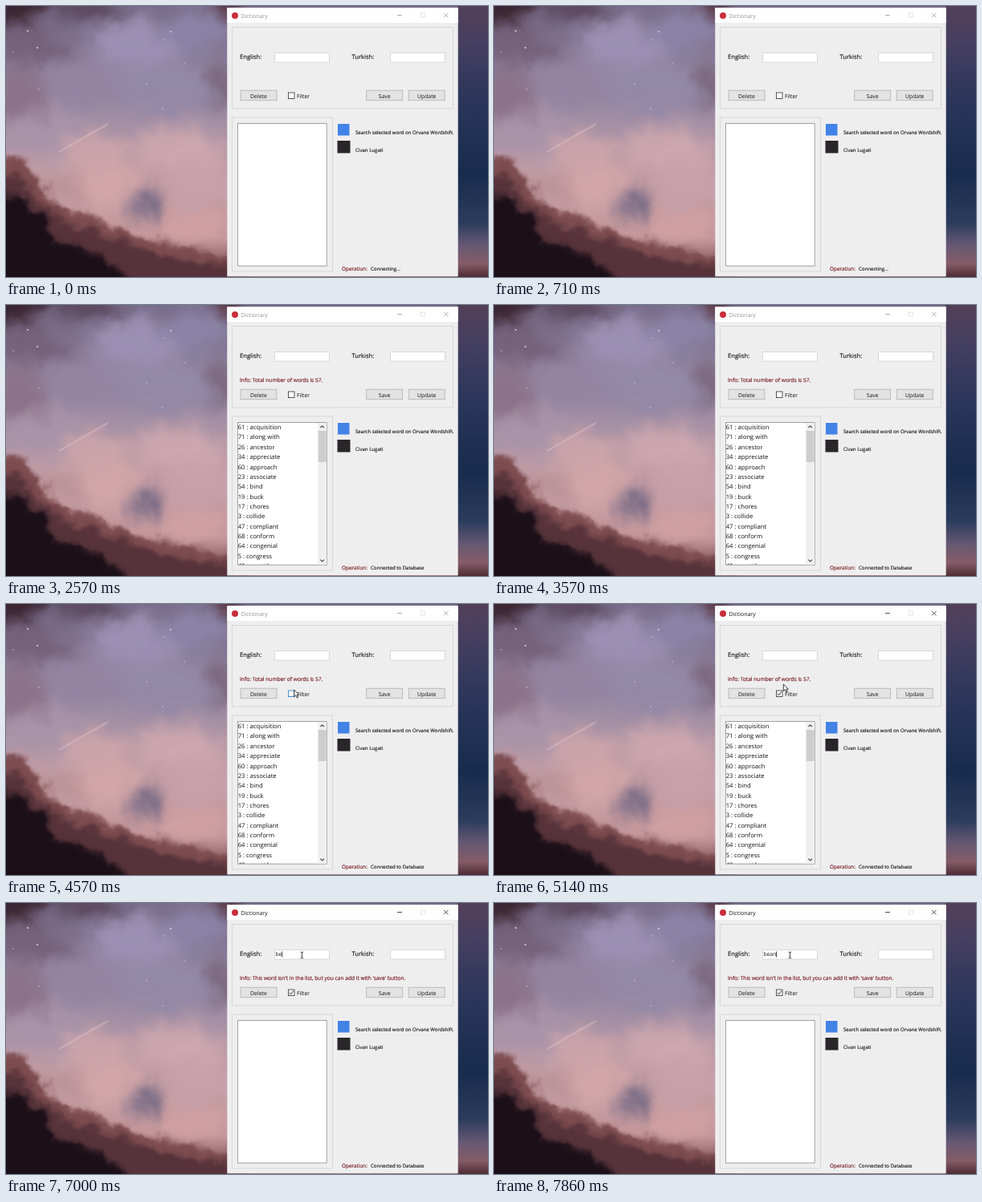
These frames come from a looping animation (600x338 px, 8000 ms). An HTML page:

```html
<!DOCTYPE html>
<html lang="en">
<head>
<meta charset="utf-8">
<title>Dictionary</title>
<style>
  html, body { margin: 0; width: 100%; height: 100%; overflow: hidden; background: #3a2c38; }
  svg { position: absolute; left: 0; top: 0; width: 600px; height: 338px; }
  text { font-family: "Open Sans", "Noto Sans", sans-serif; font-size: 6.9px; fill: #111; white-space: pre; text-rendering: geometricPrecision; }
  .label { font-size: 7.6px; stroke: #111; stroke-width: .12px; }
  .small { font-size: 6.1px; stroke: #111; stroke-width: .12px; }
  .info { font-size: 6.64px; fill: #7c2529; stroke: #7c2529; stroke-width: .2px; }
  .row { font-size: 7.7px; }
  .group { fill: none; stroke: #d2d2d2; stroke-width: .8; }
  .field { fill: #fff; stroke: #cbcbcb; stroke-width: .7; }
  .button { fill: #e3e3e3; stroke: #b0b0b0; stroke-width: .8; }
  .line { fill: none; stroke-width: .8; }
</style>
</head>
<body>
<svg viewBox="0 0 600 338">
  <defs>
    <linearGradient id="dusk" x2="0" y2="1">
      <stop offset="0" stop-color="#766a88"/>
      <stop offset=".35" stop-color="#9789a4"/>
      <stop offset=".6" stop-color="#c09ca6"/>
      <stop offset=".85" stop-color="#c4979b"/>
      <stop offset="1" stop-color="#6e4246"/>
    </linearGradient>
    <linearGradient id="night" x2="0" y2="1">
      <stop offset="0" stop-color="#53405a"/>
      <stop offset=".12" stop-color="#473f60"/>
      <stop offset=".35" stop-color="#2b365a"/>
      <stop offset=".62" stop-color="#172c4d"/>
      <stop offset=".8" stop-color="#2c3c5c"/>
      <stop offset=".88" stop-color="#645873"/>
      <stop offset=".95" stop-color="#855c68"/>
      <stop offset="1" stop-color="#4e2d36"/>
    </linearGradient>
    <filter id="cloud" x="-100" y="-100" width="800" height="538" filterUnits="userSpaceOnUse" color-interpolation-filters="sRGB">
      <feGaussianBlur stdDeviation="10" result="soft"/>
      <feTurbulence type="fractalNoise" baseFrequency=".025" numOctaves="4" seed="8"/>
      <feDisplacementMap in="soft" scale="36" xChannelSelector="R" yChannelSelector="G"/>
    </filter>
    <filter id="rock" x="-60" y="-60" width="720" height="458" filterUnits="userSpaceOnUse" color-interpolation-filters="sRGB">
      <feGaussianBlur stdDeviation="3" result="soft"/>
      <feTurbulence type="fractalNoise" baseFrequency=".04" numOctaves="4" seed="3"/>
      <feDisplacementMap in="soft" scale="24" xChannelSelector="R" yChannelSelector="G"/>
    </filter>
  </defs>
  <rect width="600" height="338" fill="url(#dusk)"/>
  <g id="clouds" filter="url(#cloud)"></g>
  <g filter="url(#rock)">
    <path d="M-40 182L22 196 48 226 62 250 110 266 165 288 220 300 300 318V380H-40z" fill="#7d4c50"/>
    <path d="M-40 206L16 214 40 240 62 266 120 284 170 304 230 318 300 326V380H-40z" fill="#56323a"/>
    <path d="M-40 232L14 238 42 258 60 288 100 308 145 330 160 380H-40z" fill="#1c1018"/>
  </g>
  <path d="M66 182L127 147" stroke="#e4c4cc" stroke-width="2.5" opacity=".4"/>
  <g id="stars" fill="#f0c8ca"></g>
  <rect x="562" width="38" height="338" fill="url(#night)"/>
</svg>

<svg viewBox="0 0 600 338">
  <defs><clipPath id="listClip"><rect x="289" y="147" width="99" height="177"/></clipPath></defs>
  <rect x="275.3" y="2.3" width="287.4" height="335" fill="#efeeef"/>
  <rect x="275.3" y="2.3" width="287.4" height="18.7" fill="#fff"/>
  <circle cx="285" cy="12" r="4" fill="#c92f3b"/>
  <text id="title" x="292.5" y="14.5" style="font-size:7px">Dictionary</text>
  <g id="controls" class="line"><path d="M487 11.5h6"/><path d="M545 8.8l5.6 5.6m0-5.6l-5.6 5.6"/></g>
  <rect class="line" x="516.2" y="9" width="5" height="5" stroke="#ddd"/>

  <rect class="group" x="281.5" y="26.5" width="275" height="101.5"/>
  <rect class="group" x="281.5" y="139" width="125" height="192"/>
  <text class="label" x="291" y="66.3">English:</text>
  <text class="label" x="430.5" y="66.3">Turkish:</text>
  <rect class="field" x="334.7" y="58.4" width="67.6" height="11.7"/>
  <rect class="field" x="478.7" y="58.4" width="68" height="11.7"/>
  <text id="typed" x="335.5" y="66.4" style="font-size:6.6px"></text>
  <path id="caret" class="line" stroke="#111"/>
  <text id="info" class="info" x="291" y="96"></text>

  <g id="buttons" text-anchor="middle"></g>
  <rect id="box" x="351.4" y="108" width="7.6" height="7.6" fill="#fff" stroke-width=".8"/>
  <path id="tick" class="line" d="M352.8 111.8l1.8 1.9 3.2-4.2" stroke="#111" style="stroke-width:.9"/>
  <text x="362" y="114.7">Filter</text>

  <rect x="288.5" y="146.5" width="110.7" height="177.7" fill="#fff" stroke="#989898" stroke-width=".9"/>
  <g id="rows" clip-path="url(#listClip)"></g>
  <g id="scrollbar">
    <rect x="388" y="147" width="11" height="177" fill="#f0f0f0"/>
    <rect x="388.7" y="157" width="10" height="39" fill="#cdcdcd"/>
    <path class="line" d="M391.3 153.2l2.4-2.4 2.4 2.4M391.3 317.6l2.4 2.4 2.4-2.4" stroke="#444" style="stroke-width:1.1"/>
  </g>

  <rect x="413" y="147" width="14.5" height="14.5" fill="#4383e8"/>
  <text class="small" x="435" y="160">Search selected word on Orvane Wordshift.</text>
  <rect x="412.5" y="168" width="16" height="15.5" fill="#292629"/>
  <text class="small" x="435" y="182">Civan Lugati</text>
  <text class="info" x="418" y="330" style="font-size:6.4px">Operation:</text>
  <text id="status" class="small" x="454" y="330"></text>

  <path id="arrow" d="M0 0v8.4l2-1.8 1.5 3.2 1.5-.7-1.5-3.1h2.7z" fill="#fff" stroke="#111" stroke-width=".8"/>
  <path id="beam" class="line" d="M-1.7-3.8h1.2l.5.5.5-.5h1.2M0-3.3v6.6M-1.7 3.8h1.2l.5-.5.5.5h1.2" stroke="#111"/>
</svg>

<script>
const $ = id => document.getElementById(id);

// Cloud bank: x, y, horizontal radius, vertical radius, colour
const clouds = [
  [5, 0, 48, 26, "#3d2632"], [100, 2, 42, 18, "#5c4a60"], [30, 50, 50, 26, "#75627c"],
  [160, 45, 55, 32, "#9a90b2"], [235, 30, 45, 28, "#8a83a5"], [275, 2, 20, 16, "#55303c"],
  [85, 95, 60, 30, "#9484a2"], [15, 115, 38, 34, "#8c7288"], [200, 100, 55, 30, "#9288a8"],
  [270, 100, 16, 24, "#7a667c"], [50, 160, 50, 28, "#a993a8"], [110, 185, 45, 24, "#c9a3aa"],
  [215, 178, 55, 26, "#cba6ae"], [245, 225, 45, 28, "#c6a0aa"], [130, 228, 50, 26, "#d2a6a8"],
  [70, 225, 32, 18, "#bb9498"], [225, 275, 50, 18, "#d0a0a2"], [174, 248, 18, 20, "#756984"]
];
$("clouds").innerHTML = clouds.map(([x, y, rx, ry, fill]) =>
  `<ellipse cx="${x}" cy="${y}" rx="${rx}" ry="${ry}" fill="${fill}"/>`).join("");

const stars = [[39, 52], [9, 57], [196, 41], [205, 32], [195, 128], [175, 97], [27, 31], [222, 72], [41, 104]];
$("stars").innerHTML = stars.map(([x, y], i) =>
  `<circle cx="${x}" cy="${y}" r="${i % 3 ? .7 : 1.1}"/>`).join("");

const buttons = [["Delete", 292], ["Save", 448.7], ["Update", 501.2]];
$("buttons").innerHTML = buttons.map(([name, x]) =>
  `<rect class="button" x="${x}" y="105.2" width="45" height="12.5"/><text x="${x + 22.5}" y="114.7">${name}</text>`).join("");

const words = ["61 : acquisition", "71 : along with", "26 : ancestor", "34 : appreciate", "60 : approach",
  "23 : associate", "54 : bind", "19 : buck", "17 : chores", "3 : collide", "47 : compliant",
  "68 : conform", "64 : congenial", "5 : congress", "48 : consider"];
const listRows = list => list.map((word, i) =>
  `<text class="row" x="288.7" y="${155.1 + 12.35 * i}">${word}</text>`).join("");

const LOOP = 8000, CONNECTED = 860, CLICK = 4710, TYPING = [6570, 6860, 7290, 7570];
const ease = (t, from, to) => {
  const p = Math.min(1, Math.max(0, (t - from) / (to - from)));
  return p * p * (3 - 2 * p);
};
const show = (id, visible) => $(id).style.display = visible ? "" : "none";
const setText = (id, value) => { if ($(id).textContent !== value) $(id).textContent = value; };
let shownRows = "";

function drawCursor(t) {
  const enter = ease(t, 3700, 4430), leave = ease(t, 4990, 5570);
  const x = 250 + 108.7 * enter + 9.7 * leave;
  const y = 190 - 82.8 * enter - 42.2 * leave;
  const overField = y < 70;
  show("arrow", t >= 3700 && !overField);
  show("beam", overField);
  $("arrow").setAttribute("transform", `translate(${x} ${y})`);
  $("beam").setAttribute("transform", `translate(${x} ${y})`);
  const hover = x >= 351 && x <= 359.5 && y >= 107 && y <= 116;
  $("box").setAttribute("stroke", hover ? "#2877bd" : "#333");
}

function draw(t) {
  const connected = t >= CONNECTED, active = t >= CLICK;
  const letters = TYPING.filter(at => t >= at).length;
  const missing = letters > 1;
  $("title").style.fill = active ? "#111" : "#929292";
  $("controls").setAttribute("stroke", active ? "#222" : "#999");
  show("tick", active);

  setText("status", connected ? "Connected to Database" : "Connecting...");
  setText("info", !connected ? "" : missing
    ? "Info: This word isn't in the list, but you can add it with 'save' button."
    : "Info: Total number of words is 57.");

  const rows = !connected || missing ? "" : listRows(letters ? words.slice(6, 8) : words);
  if (rows !== shownRows) $("rows").innerHTML = shownRows = rows;
  show("scrollbar", connected && !letters);

  setText("typed", "bean".slice(0, letters));
  const caretX = 336 + $("typed").getComputedTextLength();
  $("caret").setAttribute("d", `M${caretX} 60.5v7`);
  show("caret", letters > 0);
  drawCursor(t);
}

const start = performance.now();
function tick() {
  draw((performance.now() - start) % LOOP);
  requestAnimationFrame(tick);
}
tick();
</script>
</body>
</html>
```
